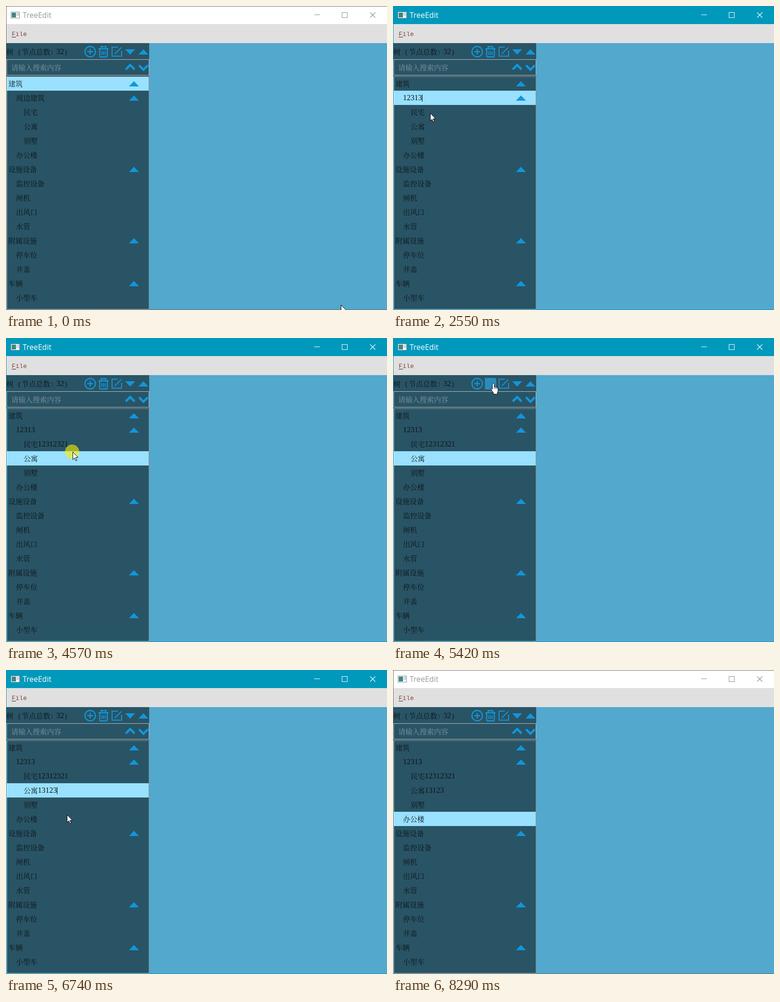
Animation of 801 by 639 pixels, one loop 8.37 s. Source, as an HTML page with a canvas:

```html
<!DOCTYPE html>
<html lang="zh">
<head>
<meta charset="utf-8">
<title>TreeEdit</title>
<style>
html, body { margin: 0; width: 100%; height: 100%; overflow: hidden; }
canvas { display: block; }
</style>
</head>
<body>
<canvas id="stage" width="801" height="639"></canvas>
<script>
const g = document.getElementById('stage').getContext('2d');
const LOOP = 8370, STEP = 76, BLUE = '#1296db', INK = '#0c1418';
const CJK = '15px "Noto Serif CJK SC","Noto Sans CJK SC","Noto Sans CJK",sans-serif';
const DIGITS = '16px "Liberation Serif",serif';
const MONO = '13.33px "Liberation Mono",monospace';

// name, depth, has children
const ROWS = [
  ['建筑', 0, 1], ['周边建筑', 1, 1], ['民宅', 2], ['公寓', 2], ['别墅', 2], ['办公楼', 1],
  ['设施设备', 0, 1], ['监控设备', 1], ['闸机', 1], ['出风口', 1], ['水管', 1],
  ['附属设施', 0, 1], ['停车位', 1], ['井盖', 1], ['车辆', 0, 1], ['小型车', 1], ['中型车', 1]
];
// start, steps, x, y
const MOVES = [
  [70, 5, 110, 206], [530, 1, 96, 206], [2470, 2, 78, 225], [2870, 10, 234, 99],
  [3790, 3, 200, 196], [4420, 3, 110, 260], [4730, 4, 190, 166], [5110, 5, 211, 95],
  [5500, 2, 234, 99], [5970, 5, 190, 240], [6580, 3, 128, 304], [6890, 1, 128, 302],
  [7040, 2, 146, 299], [7440, 3, 544, 601]
];
const PRESSES = [[620, 700], [850, 920], [2620, 2710], [3630, 3710], [4570, 4730], [5750, 5820], [6810, 6890]];
const SELECT = [[0, 0], [620, 1], [2620, 2], [4570, 3], [6810, 5]];
// typed text per row; each stamp is [time, characters shown]
const EDITS = {
  1: { from: 920, to: 2620, text: '12313', stamps: [[1930, 2], [2100, 3], [2170, 4], [2250, 5]] },
  2: { from: 3710, to: 4570, text: '12312321', stamps: [[4090, 3], [4260, 5], [4340, 6], [4410, 7], [4490, 8]] },
  3: { from: 5820, to: 6810, text: '13123', stamps: [[6130, 1], [6280, 2], [6430, 5]] }
};

const within = (t, a, b) => t >= a && t < b;
const latest = (list, t) => list.reduce((v, [at, n]) => t >= at ? n : v, 0);

function box(x, y, w, h, color) {
  g.fillStyle = color;
  g.fillRect(x, y, w, h);
}
function frame(x, y, w, h, color) {
  g.strokeStyle = color;
  g.lineWidth = 1;
  g.strokeRect(x + .5, y + .5, w - 1, h - 1);
}
function text(s, x, y, color = INK, font = CJK) {
  g.font = font;
  g.fillStyle = color;
  g.fillText(s, x, y);
}
function stroke(path, width, color = BLUE) {
  g.strokeStyle = color;
  g.lineWidth = width;
  g.stroke(new Path2D(path));
}
function fill(path, color = BLUE) {
  g.fillStyle = color;
  g.fill(new Path2D(path));
}
function triangle(x, y, dir) {
  fill(`M${x - 10.5} ${y + 5.5 * dir}h21l-10.5 ${-11 * dir}z`);
}

function pointer(t) {
  let x = 704, y = 628;
  for (const [start, n, tx, ty] of MOVES) {
    if (t < start) break;
    const k = Math.min(n, Math.floor((t - start) / STEP) + 1) / n;
    x += (tx - x) * k;
    y += (ty - y) * k;
  }
  return { x: Math.round(x), y: Math.round(y) };
}

function drawChrome(active) {
  const edge = active ? '#0c93b8' : '#6c6a69', tool = active ? '#fff' : '#8f8f8f';
  box(0, 0, 801, 639, '#53a8cd');
  box(0, 0, 801, 38, active ? '#0099bc' : '#fff');
  box(0, 38, 801, 40, '#e0e0e0');
  box(0, 0, 801, 1, edge);
  box(0, 0, 1, 639, edge);
  box(0, 638, 801, 1, edge);

  box(10, 12, 19, 14, '#fff');
  frame(10, 12, 19, 14, '#8a9299');
  box(12, 14, 9, 10, '#3f8580');
  box(23, 14, 1, 7, '#7890a0');
  box(26, 14, 1, 7, '#7890a0');
  text('TreeEdit', 35, 25, active ? '#fff' : '#999', '16px "Open Sans",sans-serif');
  box(648, 18, 12, 1, tool);
  frame(706, 13, 12, 12, tool);
  stroke('M765.5 13.5l11 11m0-11l-11 11', 1.1, tool);

  text('File', 12, 63, '#804536', MONO);
  box(12, 65, 9, 1, '#33201c');
}

function drawHeader(hover, down, searching) {
  box(1, 78, 300, 560, '#295465');
  text('树', 1, 101.5);
  text('(', 24, 101, INK, MONO);
  text('节点总数', 33, 101.5);
  text(':', 93, 101, INK, MONO);
  text('32', 106, 101, INK, DIGITS);
  text(')', 122, 101, INK, MONO);

  if (hover >= 0) box(165 + 28 * hover, 84, 24, 24, down ? '#10222c' : '#3d83a5');
  g.strokeStyle = BLUE;
  g.lineWidth = 2.3;
  g.beginPath();
  g.arc(177, 96, 11, 0, 7);
  g.stroke();
  stroke('M171 96h12m-6-6v12', 2.3);
  stroke('M194.5 90h21M200 89v-3.5h10V89M197 90v15q0 2 2 2h12q2 0 2-2V90', 2.3);
  stroke('M201.5 95v8m3.5-8v8m3.5-8v8', 1.8);
  stroke('M235 86.5h-12v19h20V94M228.5 101L242.5 87', 2);
  triangle(261, 96.5, -1);
  triangle(289, 96.5, 1);

  frame(1, 112, 300, 34, searching ? BLUE : '#b9bebe');
  text('请输入搜索内容', 11, 134.5, '#81959d');
  g.lineCap = 'round';
  stroke('M253 132l8-8 8 8M281 126l8 8 8-8', 4.6);
  g.lineCap = 'butt';
}

function drawRow(i, t, selected) {
  const [name, depth, parent] = ROWS[i];
  const top = 148 + 30 * i, x = 5 + 16 * depth, edit = EDITS[i];
  if (i === selected) box(2, top, 298, 30, '#99e1ff');
  const count = edit ? latest(edit.stamps, t) : 0;
  const editing = edit && within(t, edit.from, edit.to);
  const replaced = i === 1 && count > 0;
  const marked = i === 1 && editing && !count;
  const label = replaced ? '' : name;
  const end = x + 15 * label.length;
  if (marked) box(x, top + 8, 61, 15, '#000080');
  text(label, x, top + 20.5, marked ? '#fff' : INK);
  if (count) text(edit.text.slice(0, count), end, top + 20, INK, DIGITS);
  if (editing && !marked) box(end + 8 * count, top + 8, 1, 15, '#000');
  if (parent) triangle(269, top + 15.5, 1);
}

function drawTree(t) {
  const selected = latest(SELECT, t);
  g.save();
  g.beginPath();
  g.rect(1, 148, 300, 489);
  g.clip();
  ROWS.forEach((_, i) => drawRow(i, t, selected));
  g.restore();
  box(1, 148, 300, 1, '#8d9291');
  box(300, 148, 1, 490, '#8d8a86');
  box(1, 148, 1, 490, '#d5e8ef');
  box(1, 637, 300, 1, '#a9bdc5');
}

function drawTip() {
  box(206, 49, 54, 32, '#fff');
  frame(206, 49, 54, 32, '#353637');
  text('编辑', 218, 70.5);
}

function drawPointer({ x, y }, hand, down) {
  if (down) {
    g.fillStyle = 'rgba(255,240,0,.6)';
    g.beginPath();
    g.arc(x - 1, y, 15, 0, 7);
    g.fill();
  }
  const shape = hand
    ? 'M-2 1Q0-1.5 2 1V8Q4 6.5 5 8.5Q7 7.5 8 9.5Q10 9 10 11.5V16L8.5 20V23H0V20L-5 13Q-5.5 10-2 12.5Z'
    : 'M.5.5V16.5L4 13L6.6 19L9 18L6.4 12H11.5Z';
  g.save();
  g.translate(x, y);
  fill(shape, '#fff');
  stroke(shape, 1, '#000');
  if (hand) stroke('M2 8v4M5 9v3.5M8 10v3', .8, '#000');
  g.restore();
}

function draw(t) {
  const p = pointer(t);
  const active = within(t, 620, 8290);
  const down = PRESSES.some(([a, b]) => within(t, a, b));
  const overIcons = within(p.y, 84, 109) && within(p.x, 165, 301);
  const hover = overIcons ? Math.floor((p.x - 163) / 28) : -1;
  const searching = within(p.y, 112, 146) && p.x < 301;
  drawChrome(active);
  drawHeader(hover, down, searching);
  drawTree(t);
  if (within(t, 3710, 3865) || within(t, 5750, 5970)) drawTip();
  if (t < 8290) drawPointer(p, overIcons, down);
}

const begin = performance.now();
function tick() {
  draw((performance.now() - begin) % LOOP);
  requestAnimationFrame(tick);
}
tick();
</script>
</body>
</html>
```
